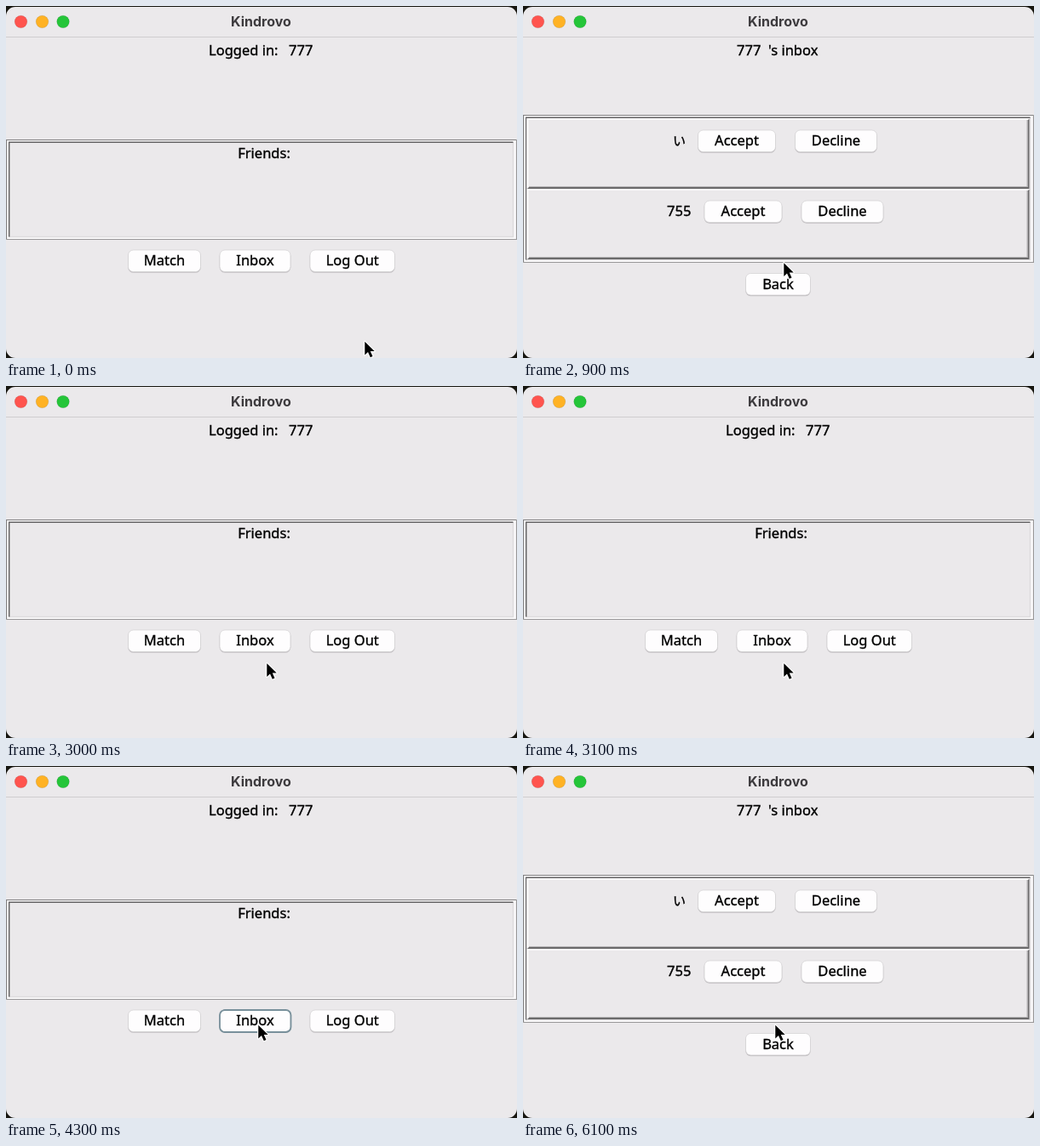
Recreate the animation shown at these times as an HTML page. Size 600 by 414 pixels, loop 6.2 s.

```html
<!DOCTYPE html>
<html lang="en">
<head>
<meta charset="utf-8">
<title>Kindrovo</title>
<style>
html, body { margin: 0; width: 100%; height: 100%; overflow: hidden; background: #16150f; }
svg { display: block; width: 600px; height: 414px; }
text { font: 16.5px "Noto Sans", "Open Sans", sans-serif; fill: #000; stroke: #000; stroke-width: .35px; white-space: pre; }
.title { font: 700 16px Inter, Roboto, sans-serif; fill: #3d3b3e; stroke: none; }
.jp { font: 500 15px "Noto Sans CJK JP", "Noto Sans CJK", sans-serif; }
.mid { text-anchor: middle; }
</style>
</head>
<body>
<svg id="stage" viewBox="0 0 600 414"></svg>
<script>
const LOOP = 6200, STEP = 100;

const rect = (x, y, w, h, fill, extra = '') =>
  `<rect x="${x}" y="${y}" width="${w}" height="${h}" fill="${fill}" ${extra}/>`;
const line = (d, color, width = 1) =>
  `<path d="${d}" fill="none" stroke="${color}" stroke-width="${width}"/>`;
const text = (x, y, s, cls = '') => `<text x="${x}" y="${y}" class="${cls}">${s}</text>`;
const dot = (x, color) =>
  `<circle cx="${x}" cy="18.5" r="7.3" fill="${color}" stroke="#000" stroke-opacity=".12" stroke-width=".8"/>`;

function button(x, y, w, label) {
  return rect(x - .3, y + .8, w + .6, 26, '#c3c0c3', 'rx="6.5"') +
    rect(x, y, w, 25.5, '#fefdfe', 'rx="6" stroke="#d2d0d2" stroke-width=".7"') +
    text(x + w / 2, y + 18, label, 'mid');
}

const ring = (id, x, y, w) => rect(x, y, w, 26, 'none',
  `id="${id}" rx="6" stroke="#78909b" stroke-width="1.8"`);

// Bevelled edges: top and left in one colour, bottom and right in the other
function bevel(x, y, w, h, topLeft, bottomRight, width) {
  const r = x + w, b = y + h;
  return line(`M${r} ${y}V${b}H${x}`, bottomRight, width) +
    line(`M${x} ${b}V${y}H${r}`, topLeft, width);
}

const sunken = (y, h) =>
  rect(0, y, 600, h, '#fbfafb') + rect(3, y + 3, 593, h - 6, '#ebe9eb') +
  bevel(.5, y + .5, 599, h - 1, '#828182', '#989798', 1.2) +
  bevel(3.7, y + 3.2, 591.8, h - 6.7, '#636263', '#dddbdd', 1.5);

const cell = y =>
  rect(4.5, y, 590, 83, '#ebe9eb') +
  bevel(5.5, y + 1, 588, 81, '#fdfcfd', '#6b6a6b', 2) +
  line(`M7 ${y + 80.5}H592V${y + 2}`, '#b5b3b5');

const home = text(238, 58, 'Logged in:') + text(332, 58, '777') +
  sunken(157, 118) + text(303, 179, 'Friends:', 'mid') +
  button(143.5, 287, 85, 'Match') + button(251, 287, 83, 'Inbox') +
  button(357, 287, 99.5, 'Log Out') + ring('inboxRing', 251, 287, 83.5);

const inbox = text(251, 58, '777') + text(288, 58, "'s inbox") +
  sunken(128, 174) + cell(132) + cell(215) +
  text(176, 164, 'い', 'jp') + button(205.5, 146, 91, 'Accept') + button(319.5, 146, 96, 'Decline') +
  text(169, 247, '755') + button(213, 229, 91, 'Accept') + button(327, 229, 96, 'Decline') +
  button(261.5, 314.5, 76, 'Back') + ring('backRing', 261.5, 314.5, 76.5);

const arrow = 'M.8 1.8V17.4L4.5 14L7.3 20.2L10 19L7.3 13H12.2Z';

document.getElementById('stage').innerHTML =
  rect(0, 0, 600, 414, '#16150f') +
  rect(0, 1, 600, 413, '#ebe9eb', 'rx="11"') +
  rect(0, 36, 600, 1, '#cfcdcf') +
  dot(17.5, '#ff544e') + dot(42.5, '#ffb224') + dot(67, '#25c539') +
  text(299.5, 24, 'Kindrovo', 'title mid') +
  `<g id="home">${home}</g><g id="inbox">${inbox}</g>` +
  `<path id="cursor" d="${arrow}" fill="#000" stroke="#fff" stroke-width="2.4"
    stroke-linejoin="round" paint-order="stroke"/>`;

const el = id => document.getElementById(id);
const show = (id, on) => el(id).style.display = on ? '' : 'none';
const between = (t, a, b) => t >= a && t < b;

// Pointer stops: time, x, y
const stops = [
  [0, 420.5, 393], [700, 305.5, 300.5], [1800, 305.5, 300.5], [2100, 305.5, 324.5],
  [3800, 305.5, 324.5], [4200, 295.5, 303], [LOOP, 295.5, 303]
];

function pointer(t) {
  const i = stops.findIndex(s => s[0] > t);
  const [t0, x0, y0] = stops[i - 1], [t1, x1, y1] = stops[i];
  const p = (t - t0) / (t1 - t0), k = p * p * (3 - 2 * p);
  return [x0 + (x1 - x0) * k, y0 + (y1 - y0) * k];
}

function draw(now) {
  const t = Math.floor(((now - start) % LOOP) / STEP) * STEP;
  const inInbox = between(t, 800, 2900) || t >= 4400;
  show('home', !inInbox);
  show('inbox', inInbox);
  show('inboxRing', between(t, 700, 800) || between(t, 4300, 4400));
  show('backRing', between(t, 2500, 2900));
  el('backRing').style.opacity = t < 2600 ? .6 : 1;
  el('cursor').setAttribute('transform', `translate(${pointer(t)})`);
}

const start = performance.now();
function tick() {
  draw(performance.now());
  requestAnimationFrame(tick);
}
tick();
</script>
</body>
</html>
```
